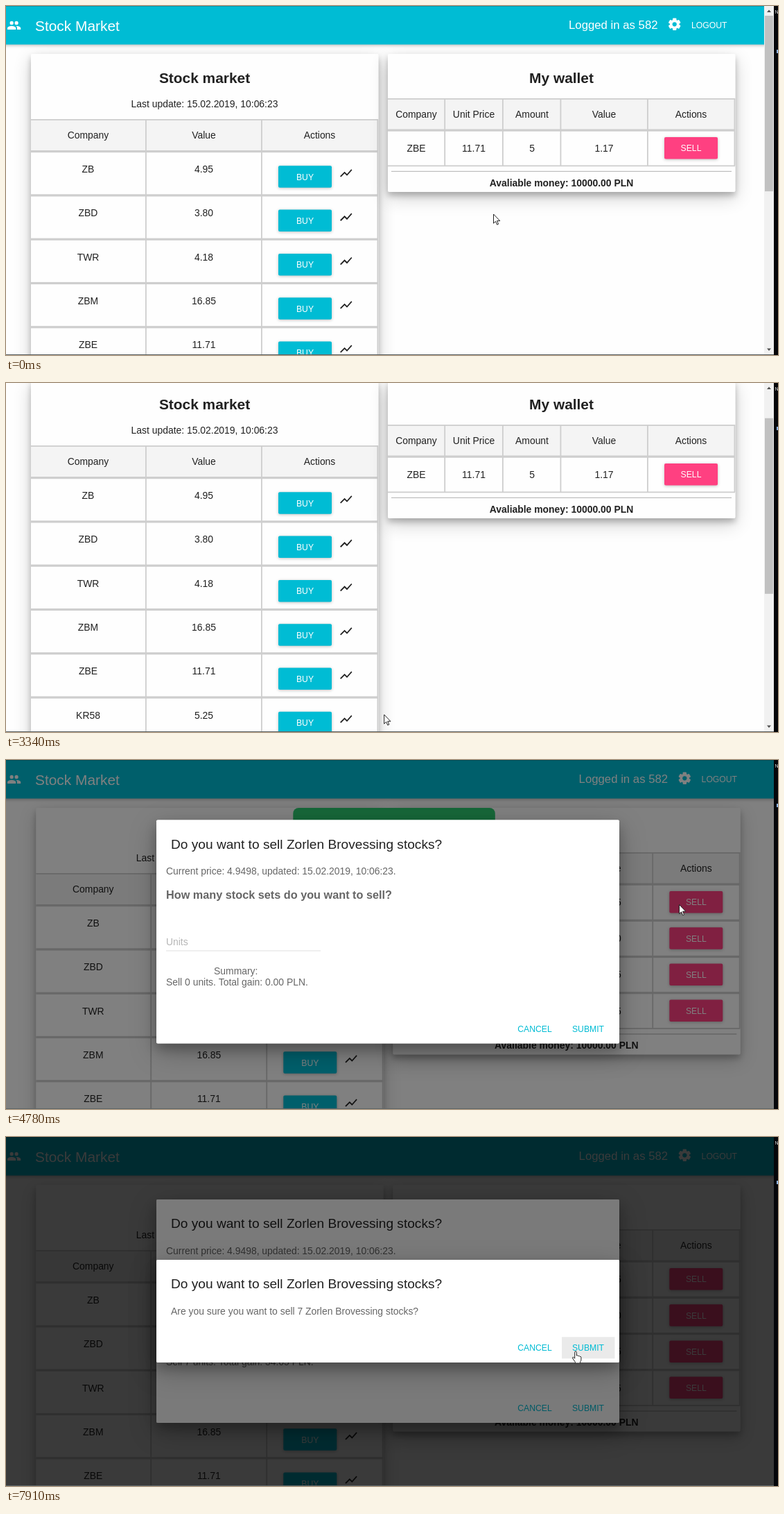
An HTML page with a canvas for the animation above (8000 ms loop, 1114 px wide and 503 px high).

```html
<!DOCTYPE html>
<html lang="en">
<head>
<meta charset="utf-8">
<title>Stock Market</title>
<style>
html, body { margin: 0; width: 100%; height: 100%; overflow: hidden; background: #fff; }
canvas { display: block; width: 1114px; height: 503px; }
</style>
</head>
<body>
<canvas id="stage" width="1114" height="503"></canvas>
<script>
const ctx = document.getElementById('stage').getContext('2d');
const LOOP = 8000, W = 1108, H = 503;
const CYAN = '#00bcd4', PINK = '#ff4081', INK = '#212121', LINE = '#cecece';
const COMPANY = 'Zorlen Brovessing', STAMP = '15.02.2019, 10:06:23', PRICE = 4.9498;
const BODY = 13.92, BUTTON = 12.2, TITLE = 20.9, SMALL = 10.44;
const OVERLAY = 0.52;

// Moments at which the interface reacts
const AT = { edit: 1000, home: 3300, toast: 3480, wallet: 4060, sell: 4590,
  units: 5400, toastEnd: 5200, blur: 7335, confirm: 7433 };

const stocks = [['ZB', '4.95'], ['ZBD', '3.80'], ['TWR', '4.18'],
  ['ZBM', '16.85'], ['ZBE', '11.71'], ['KR58', '5.25']];
const oldWallet = [['ZBE', '11.71', '5', '1.17']];
const newWallet = [['ZB', '4.95', '7', '34.65'], ['ZBD', '3.80', '11', '41.80'],
  ['ZBM', '16.85', '5', '84.25'], ['ZBE', '11.71', '5', '58.55']];
const fields = ['PLN Amount', COMPANY, 'ZB Den', 'Tarnwick Rim', 'ZB Dime', 'ZB Excursion', 'Kelrow 58'];

// time, x, y, shape until the next entry
const pointer = [
  [0, 703, 299.5, 'arrow'], [150, 703, 299.5, 'arrow'], [800, 962, 22, 'hand'],
  [1050, 962, 22, 'arrow'], [1420, 320, 268, 'beam'], [1800, 320, 268, 'beam'],
  [1980, 320, 330, 'beam'], [2300, 320, 330, 'beam'], [2470, 320, 433, 'beam'],
  [2780, 320, 433, 'arrow'], [3000, 544, 478, 'hand'], [3320, 544, 478, 'arrow'],
  [3700, 694, 413, 'arrow'], [3950, 694, 413, 'arrow'], [4400, 971, 208, 'hand'],
  [4590, 971, 208, 'arrow'], [5050, 971, 208, 'arrow'], [5350, 350, 264, 'beam'],
  [5430, 350, 264, 'arrow'], [5650, 446, 262, 'arrow'], [6500, 446, 262, 'arrow'],
  [7050, 841, 394, 'hand'], [7433, 841, 394, 'arrow'], [7600, 841, 394, 'arrow'],
  [7850, 822, 309, 'hand'], [8000, 822, 309, 'hand']
];

const peopleIcon = new Path2D('M16 11a3 3 0 1 0 0-6 3 3 0 0 0 0 6zM8 11a3 3 0 1 0 0-6 3 3 0 0 0 0 6zM8 13c-2.33 0-7 1.17-7 3.5V19h14v-2.5c0-2.33-4.67-3.5-7-3.5zM16 13l-1 .05c1.2.85 2 1.97 2 3.45V19h6v-2.5c0-2.33-4.67-3.5-7-3.5z');
const chartIcon = new Path2D('M3.5 18.49l6-6.01 4 4L22 6.92l-1.41-1.41-7.09 7.97-4-4L2 16.99z');
const arrowShape = new Path2D('M.5.5v13.2l3-2.8 2.1 4.8 2-.9-2.1-4.6h4.3z');
const handShape = new Path2D('M-1.3 8V1.3a1.3 1.3 0 0 1 2.6 0V6q2-.7 2.4.6 2-.5 2.3.8 1.9-.3 1.9 1.2V12q0 2-1.4 3.2V17H-.6v-1.6L-4.3 10q-.6-1.6.8-1.7 1 .2 2.2 1.9z');

const clamp = v => Math.max(0, Math.min(1, v));
const mix = (a, b, k) => a + (b - a) * k;
const smooth = k => k * k * (3 - 2 * k);

// cubic-bezier(.23, 1, .32, 1)
function easeOut(k) {
  k = clamp(k);
  let lo = 0, hi = 1;
  for (let i = 0; i < 20; i++) {
    const s = (lo + hi) / 2, r = 1 - s;
    if (0.69 * r * r * s + 0.96 * r * s * s + s * s * s < k) lo = s; else hi = s;
  }
  return 1 - (1 - lo) ** 3;
}
const since = (t, start, span = 450) => easeOut((t - start) / span);

function rect(x, y, w, h, color) {
  ctx.fillStyle = color;
  ctx.fillRect(x, y, w, h);
}

function box(x, y, w, h, color, radius = 2) {
  ctx.fillStyle = color;
  ctx.beginPath();
  ctx.roundRect(x, y, w, h, radius);
  ctx.fill();
}

function shadowBox(x, y, w, h, color, shadows) {
  for (const [dy, blur, alpha] of shadows) {
    ctx.save();
    ctx.shadowColor = `rgba(0,0,0,${alpha})`;
    ctx.shadowBlur = blur;
    ctx.shadowOffsetY = dy;
    box(x, y, w, h, color);
    ctx.restore();
  }
}
const card = (x, y, w, h) => shadowBox(x, y, w, h, '#fefefe', [[8.7, 26, 0.19], [5.2, 8.7, 0.23]]);
const sheet = (y, h) => shadowBox(217, y, 668, h, '#fff', [[12, 39, 0.25], [8.7, 15.6, 0.22]]);

// y is the middle of the capitals
function text(str, x, y, size = BODY, color = INK, align = 'left', weight = '') {
  ctx.font = `${weight} ${size}px "Liberation Sans", Arial, sans-serif`;
  ctx.fillStyle = color;
  ctx.textAlign = align;
  ctx.fillText(str, x, y + size * 0.36);
}
const centered = (str, x, y, size, color, weight) => text(str, x, y, size, color, 'center', weight);

function button(label, x, y, color) {
  shadowBox(x, y, 77, 31.5, color, [[1, 4, 0.25]]);
  centered(label, x + 38.5, y + 16, BUTTON, '#fff');
}

function icon(path, x, y, color) {
  ctx.save();
  ctx.translate(x, y);
  ctx.scale(0.87, 0.87);
  ctx.fillStyle = color;
  ctx.fill(path);
  ctx.restore();
}

function gear(x, y) {
  ctx.save();
  ctx.translate(x, y);
  for (let i = 0; i < 6; i++) {
    box(-2.7, -8.8, 5.4, 6, '#fff', 1);
    ctx.rotate(Math.PI / 3);
  }
  disc(0, 0, 6.7, '#fff');
  disc(0, 0, 3.1, CYAN);
  ctx.restore();
}

function disc(x, y, r, color) {
  ctx.fillStyle = color;
  ctx.beginPath();
  ctx.arc(x, y, r, 0, 7);
  ctx.fill();
}

function triangle(x, y, dir) {
  ctx.fillStyle = '#505050';
  ctx.beginPath();
  ctx.moveTo(x - 3, y);
  ctx.lineTo(x + 3, y);
  ctx.lineTo(x, y - 3.5 * dir);
  ctx.fill();
}

function header(shift) {
  shadowBox(-20, -10, W + 40, 65.5, CYAN, [[1, 5, 0.3]]);
  rect(0, 0, W, 1, '#0897a9');
  icon(peopleIcon, 1.2, 17.5, '#fff');
  text('Stock Market', 42, 28, TITLE, '#fff');
  text('Logged in as 582', 812 + shift, 26.5, 16.75, '#fff');
  gear(964.7 + shift, 26.3);
  text('LOGOUT', 989 + shift, 27.3, BUTTON, '#fff');
}

function market() {
  card(36, 69, 501.5, 540);
  centered('Stock market', 286.5, 103, TITLE, INK, 'bold');
  centered('Last update: ' + STAMP, 286.5, 141);
  rect(36, 163, 501, 46, '#f4f4f4');
  rect(36, 163, 501, 1.8, LINE);
  const bottom = 209.5 + stocks.length * 63.3;
  const columns = [118.5, 285.5, 452.5];
  ['Company', 'Value', 'Actions'].forEach((name, i) => centered(name, columns[i], 186.3));
  stocks.forEach(([name, value], i) => {
    const y = 235 + i * 63.3;
    centered(name, columns[0], y);
    centered(value, columns[1], y);
    button('BUY', 393, y - 4.7, CYAN);
    icon(chartIcon, 480.3, y - 4.5, INK);
  });
  for (let i = 0; i <= stocks.length; i++) rect(36, 208 + i * 63.3, 501, 3.2, LINE);
  for (const x of [201, 368, 535.5]) rect(x, 163, 1.8, bottom - 163, LINE);
}

function wallet(rows) {
  const extra = (rows.length - 1) * 52.2;
  card(551, 69, 501.5, 199 + extra);
  centered('My wallet', 801.5, 103, TITLE, INK, 'bold');
  rect(551, 133, 501, 46, '#f4f4f4');
  rect(551, 133, 501, 1.8, LINE);
  const columns = [592, 675, 759, 863, 988.5];
  ['Company', 'Unit Price', 'Amount', 'Value', 'Actions']
    .forEach((name, i) => centered(name, columns[i], 156.3));
  rows.forEach((row, i) => {
    const y = 205 + i * 52.2;
    row.forEach((cell, j) => centered(cell, columns[j], y));
    button('SELL', 950, y - 16, PINK);
    rect(551, 177.5 + i * 52.2, 501, 3.2, LINE);
  });
  rect(551, 229.5 + extra, 501, 1.8, LINE);
  for (const x of [632.3, 716, 799.5, 925, 1050.5]) rect(x, 133, 1.8, 97 + extra, LINE);
  rect(556, 237.8 + extra, 491, 1.2, '#bdbdbd');
  centered('Avaliable money: 10000.00 PLN', 801.5, 254.6 + extra, BODY, INK, 'bold');
}

function homePage(t) {
  market();
  wallet(t >= AT.wallet || t < AT.edit === false && t >= AT.wallet ? newWallet : oldWallet);
  if (t >= AT.toast && t < AT.toastEnd) {
    box(407, 69, 291.5, 52, '#2ecc71', 8);
    centered('User changed successfully', 553, 94.5, 16.7, '#fff');
  }
}

function editPage(t) {
  const values = ['10000', t < 1700 ? '0' : '7',
    t < 2080 ? '0' : t < 2200 ? '1' : '11', '0', t < 2600 ? '0' : '5', '5', '0'];
  const focus = t < 1450 ? -1 : t < 1950 ? 1 : t < 2480 ? 2 : 4;
  card(293.5, 87, 501.5, 556);
  centered('Edit user', 544, 137, TITLE, INK, 'bold');
  fields.forEach((name, i) => {
    const y = 189 + i * 62.7, on = i === focus;
    text(name, 315, y, SMALL, on ? CYAN : '#b5b5b5');
    text(values[i], 315, y + 21.5);
    rect(315, y + 32.8, 223, 1, '#dcdcdc');
    if (!on) return;
    rect(315, y + 32, 223, 1.8, CYAN);
    rect(315.5 + ctx.measureText(values[i]).width, y + 14, 1, 15, INK);
    rect(526, y + 15, 11, 13.5, '#f0f0f0');
    triangle(531.5, y + 20.3, 1);
    triangle(531.5, y + 23.5, -1);
  });
  button('SUBMIT', 505.5, 605, CYAN);
}

function scrollbar(scroll, total) {
  const track = 475;
  rect(1094, 0, 14, H, '#f1f1f1');
  rect(1095, 14 + scroll / total * track, 12, H / total * track, '#c1c1c1');
  triangle(1101, 9, 1);
  triangle(1101, 493.5, -1);
}

function shade(k) {
  rect(0, 0, W, H, `rgba(0,0,0,${OVERLAY * k})`);
}

function actions(y, hover) {
  if (hover) rect(802, y - 15.5, 76.5, 31, 'rgba(130,130,130,.17)');
  centered('CANCEL', 763, y, BUTTON, CYAN);
  centered('SUBMIT', 840, y, BUTTON, CYAN);
}

function dialogTitle(y) {
  text(`Do you want to sell ${COMPANY} stocks?`, 238, y, 19.14, INK);
}

function sellDialog(t) {
  const top = 90 - 55.7 * (1 - since(t, AT.sell));
  const gray = '#666', units = Math.max(0, Math.min(7, Math.floor((t - 5700) / 95) + 1));
  const float = since(t, AT.units), active = t >= AT.units && t < AT.blur;
  sheet(top, 322);
  dialogTitle(top + 34.5);
  text(`Current price: ${PRICE}, updated: ${STAMP}.`, 231, top + 74, BODY, gray);
  text('How many stock sets do you want to sell?', 231, top + 107.5, 16.25, gray, 'left', 'bold');

  text('Units', 231, top + mix(176, 155, float), mix(BODY, SMALL, float), active ? CYAN : '#b5b5b5');
  rect(231, top + 188, 223, 1, '#dedede');
  const line = 223 * (t < AT.blur ? float : 1 - since(t, AT.blur));
  rect(342.5 - line / 2, top + 187, line, 1.9, CYAN);
  const value = units ? String(units) : '';
  text(value, 231, top + 177);
  if (active) rect(231.5 + ctx.measureText(value).width, top + 169, 1, 15, INK);
  if (t > 5640 && t < 6520) {
    rect(441, top + 169, 12, 7.5, '#cacaca');
    triangle(447, top + 175, 1);
  }

  const summary = `Sell ${units} units. Total gain: ${(units * PRICE).toFixed(2)} PLN.`;
  text(summary, 231, top + 234, BODY, gray);
  centered('Summary:', 229.3 + ctx.measureText(summary).width / 2, top + 218, BODY, gray);
  actions(top + 300.8, t > 7020 && t < 7600);
  if (t > AT.blur && t < 7600) {
    disc(841, 391, Math.min(20, 8 + (t - AT.blur) / 8), 'rgba(110,110,110,.28)');
  }
}

function confirmDialog(t) {
  const top = 177 - 55.7 * (1 - since(t, AT.confirm));
  sheet(top, 148);
  dialogTitle(top + 34.5);
  text(`Are you sure you want to sell 7 ${COMPANY} stocks?`, 238, top + 74, BODY, '#666');
  actions(top + 126.8, t > 7800);
}

function drawPointer(t) {
  const next = Math.max(1, pointer.findIndex(p => p[0] > t));
  const [t0, x0, y0, shape] = pointer[next - 1], [t1, x1, y1] = pointer[next];
  const k = smooth((t - t0) / (t1 - t0));
  ctx.save();
  ctx.translate(mix(x0, x1, k), mix(y0, y1, k));
  if (shape === 'beam') {
    rect(-0.7, -6.5, 1.5, 13, '#111');
    rect(-3.2, -7, 6.4, 1.2, '#111');
    rect(-3.2, 6, 6.4, 1.2, '#111');
  } else {
    const path = shape === 'hand' ? handShape : arrowShape;
    ctx.fillStyle = '#fff';
    ctx.strokeStyle = '#222';
    ctx.lineWidth = 1;
    ctx.fill(path);
    ctx.stroke(path);
  }
  ctx.restore();
}

function draw(t) {
  const editing = t >= AT.edit && t < AT.home, modal = t >= AT.sell;
  let scroll = 0;
  if (editing) scroll = 148 * smooth(clamp((t - 2850) / 150));
  else if (t >= AT.home) scroll = 73 * (1 - smooth(clamp((t - 3820) / 180)));

  rect(0, 0, 1114, H, '#fefefe');
  ctx.save();
  ctx.translate(modal ? 7.3 : 0, -scroll);
  if (editing) editPage(t); else homePage(t);
  ctx.restore();

  ctx.save();
  ctx.translate(0, -scroll);
  header(modal ? 14.6 : 0);
  ctx.restore();

  if (!modal) scrollbar(scroll, editing ? 651 : 944);
  if (modal) {
    shade(since(t, AT.sell, 400));
    sellDialog(t);
  }
  if (t >= AT.confirm) {
    shade(since(t, AT.confirm, 400));
    confirmDialog(t);
  }
  rect(0, 502, W, 1, '#5c6466');
  rect(W, 0, 6, H, '#05060a');
  text('N', 1109.5, 8, 7, '#ddd');
  rect(1112, 63, 2, 5, '#8fb4e8');
  drawPointer(t);
}

let start;
function tick(now) {
  start ??= now;
  draw((now - start) % LOOP);
  requestAnimationFrame(tick);
}
requestAnimationFrame(tick);
</script>
</body>
</html>
```
